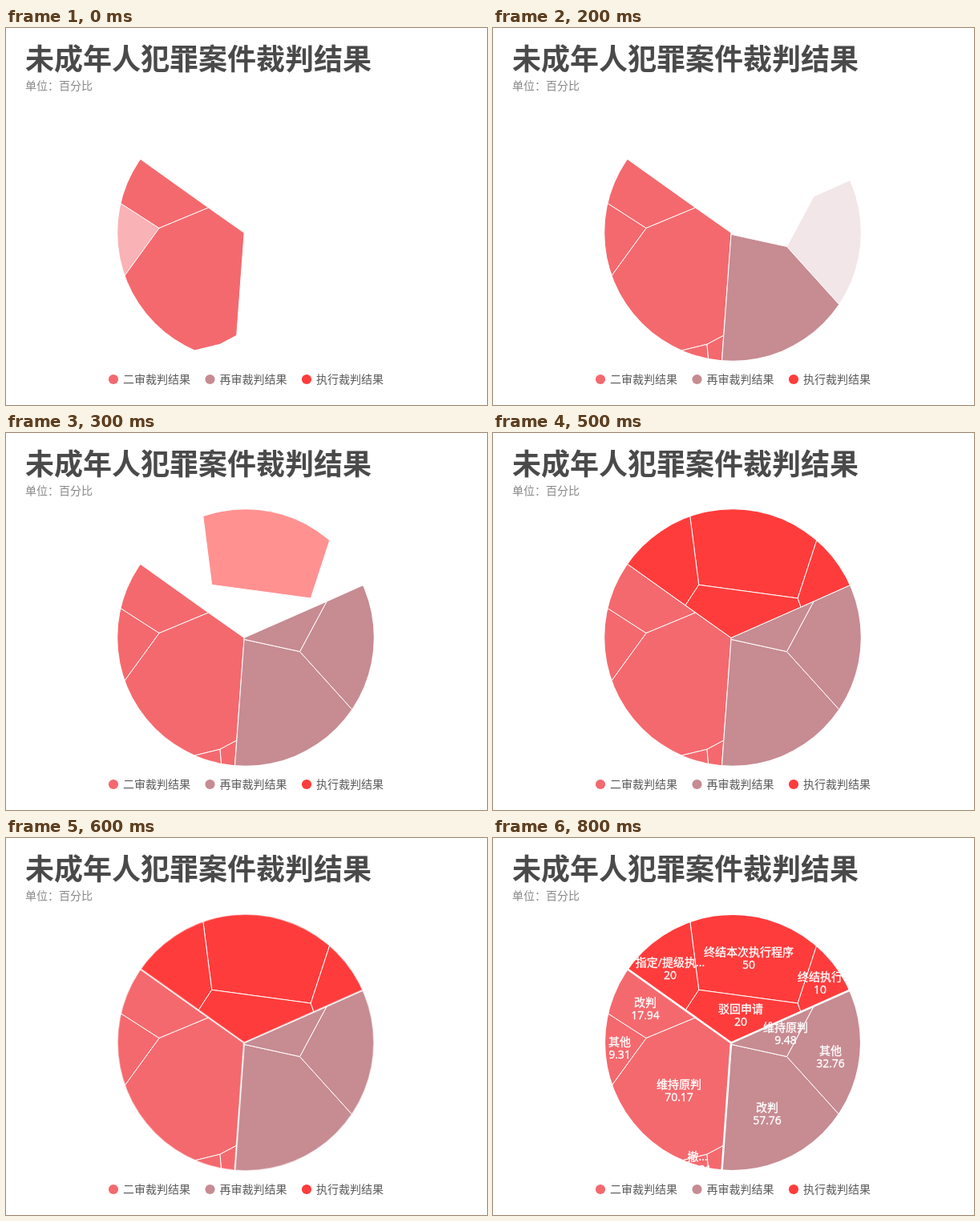
Animation of 600 by 470 pixels, one loop 2500 ms. Source, as an HTML page:

```html
<!DOCTYPE html>
<html lang="zh-CN">
<head>
<meta charset="utf-8">
<style>
html, body { margin: 0; width: 100%; height: 100%; overflow: hidden; background: #fff; }
svg { display: block; font: 14px "Open Sans", "Noto Sans CJK SC", "Noto Sans CJK", sans-serif; }
#cells { stroke: #fff; stroke-width: 1; }
#edges { fill: none; stroke: #fff; stroke-width: 2.5; }
#labels { fill: #fff; stroke: #fff; stroke-width: .35; text-anchor: middle; }
#legend { fill: #5a5a5a; }
</style>
</head>
<body>
<svg width="600" height="470" viewBox="0 0 600 470">
  <clipPath id="disc"><circle cx="299" cy="255" r="159.8"/></clipPath>
  <text x="24" y="52" font-size="36" font-weight="700" fill="#4a4a4a">未成年人犯罪案件裁判结果</text>
  <text x="24" y="77" fill="#888">单位：百分比</text>
  <g id="cells" clip-path="url(#disc)"></g>
  <g id="edges">
    <circle cx="299" cy="255" r="160.2"/>
    <path d="M125 133L297 255.3L504 163.5M297 255.3L282 463"/>
  </g>
  <g id="labels"></g>
  <g id="legend"></g>
</svg>
<script>
const $ = id => document.getElementById(id);
const colors = ['#f4696e', '#c78b92', '#ff3c3c'];

// Corners of the partition; upper-case ones lie outside the disc, which clips them.
const pts = {
  o: [297, 255.3], p: [297, 257.3], b: [252.5, 224], c: [191, 249.5],
  g: [267, 394.3], h: [287.7, 383.3], k: [366.5, 272.5], m: [400, 210],
  q: [256.7, 189.3], s: [380.2, 206], u: [240, 214.8], v: [384, 217],
  A: [125, 133], D: [96, 188.5], E: [106, 366.5], F: [174, 417],
  I: [271.5, 445.5], J: [282, 463], L: [497.5, 417.5], N: [504, 163.5],
  R: [235, 19], T: [427, 62.5]
};

// group, corners, label, value, label centre x, y
const cells = [
  [0, 'bADc', '改判', '17.94', 190, 205],
  [0, 'obcEFghp', '维持原判', '70.17', 232, 307],
  [0, 'cDE', '其他', '9.31', 158, 254],
  [0, 'gFI', '撤...', '2.001', 255, 397],
  [0, 'hgIJ'],
  [1, 'pkLJ', '改判', '57.76', 342, 336],
  [1, 'mNLk', '其他', '32.76', 421, 265],
  [1, 'omkp', '维持原判', '9.48', 365, 236],
  [2, 'qRTs', '终结本次执行程序', '50', 319, 142],
  [2, 'uARq', '指定/提级执...', '20', 221, 155],
  [2, 'ouqsv', '驳回申请', '20', 309, 213],
  [2, 'vsTN', '终结执行', '10', 408, 173]
];

$('cells').innerHTML = cells.map(([group, corners]) =>
  `<polygon fill="${colors[group]}" points="${[...corners].map(k => pts[k]).join(' ')}"/>`).join('');

$('labels').innerHTML = cells.filter(c => c[2]).map(([, , name, value, x, y]) =>
  `<text x="${x}" y="${y + 5}">${name}</text><text x="${x}" y="${y + 20.5}">${value}</text>`).join('');

$('legend').innerHTML = ['二审裁判结果', '再审裁判结果', '执行裁判结果'].map((name, i) => {
  const x = 134 + i * 120.5;
  return `<circle cx="${x}" cy="438" r="6.1" fill="${colors[i]}"/><text x="${x + 12}" y="443">${name}</text>`;
}).join('');

const shapes = [...$('cells').children];
const clamp = v => Math.max(0, Math.min(1, v));
const shown = [2.51, 4.4, 6.21, 8.56, 10.5, 12]; // cells revealed so far, per step

function draw(now) {
  const step = Math.min(8, Math.floor(now % 2500 / 100));
  const count = shown[Math.min(step, 5)];
  shapes.forEach((shape, i) => shape.setAttribute('opacity', clamp(count - i)));
  $('edges').setAttribute('opacity', clamp((step - 5) / 2));
  $('labels').setAttribute('opacity', step < 7 ? 0 : step < 8 ? 0.13 : 1);
}

const start = performance.now();
function tick() {
  draw(performance.now() - start);
  requestAnimationFrame(tick);
}
tick();
</script>
</body>
</html>
```
